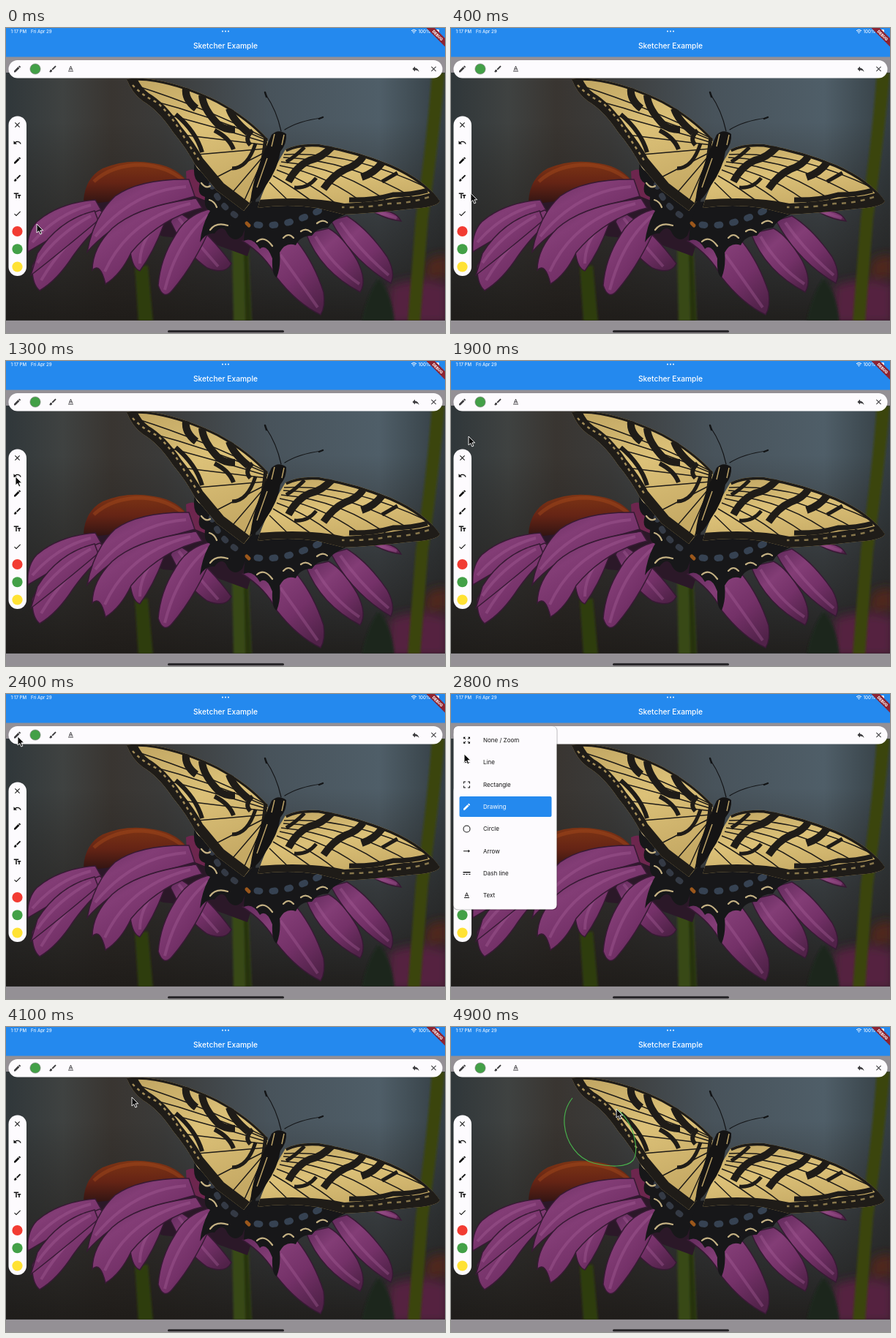
Write an HTML page that moves like this. It is 600 by 417 pixels and loops after 5000 ms.

```html
<!DOCTYPE html>
<html lang="en">
<head>
<meta charset="utf-8">
<title>Sketcher Example</title>
<style>
  :root {
    --trail: path("M0 0c-8 10-12 23-11 36 2 25 18 47 40 53 20 5 45 7 54-4 7-10 3-32-4-47-5-10-12-18-19-23");
  }
  html, body { margin: 0; width: 100%; height: 100%; overflow: hidden; background: #949095; }
  svg { display: block; position: absolute; left: 0; top: 0; }
  text { font-family: Inter, Roboto, sans-serif; }
  #menu { transform-box: fill-box; animation: menu 5s -1ms infinite; }
  #trail { d: var(--trail); stroke-dasharray: 100 300; animation: draw 5s -1ms infinite; }
  #hand { position: absolute; left: 0; top: 0; width: 0; height: 0; animation: tour 5s -1ms infinite; }
  #arrow {
    overflow: visible; offset-path: var(--trail); offset-rotate: 0deg; offset-anchor: 0 0;
    animation: follow 5s -1ms infinite;
  }
  /* Each leg advances once per 100 ms. */
  @keyframes tour {
    0% { transform: translate(42px, 268px); animation-timing-function: steps(4); }
    8% { transform: translate(27px, 226px); animation-timing-function: steps(4); }
    16% { transform: translate(10px, 190px); animation-timing-function: steps(5); }
    26% { transform: translate(13px, 158px); animation-timing-function: steps(6); }
    38% { transform: translate(24px, 103px); animation-timing-function: steps(3); }
    44%, 50% { transform: translate(16px, 58px); animation-timing-function: steps(3); }
    56% { transform: translate(18px, 82px); animation-timing-function: steps(4); }
    64% { transform: translate(40px, 152px); animation-timing-function: steps(4); }
    72%, 74% { transform: translate(273px, 148px); animation-timing-function: steps(4); }
    82% { transform: translate(172px, 96px); animation-timing-function: steps(1); }
    84%, 100% { transform: translate(166px, 97px); }
  }
  @keyframes follow {
    0%, 84% { offset-distance: 0%; animation-timing-function: steps(7); }
    98%, 100% { offset-distance: 100%; }
  }
  @keyframes draw {
    0%, 84% { stroke-dashoffset: 100.2; animation-timing-function: steps(7); }
    98%, 100% { stroke-dashoffset: 0; }
  }
  @keyframes menu {
    0%, 50% { opacity: 0; clip-path: inset(0 0 85% 0); animation-timing-function: steps(3); }
    56%, 74% { opacity: 1; clip-path: inset(0 0 0 0); animation-timing-function: steps(2); }
    78%, 100% { opacity: 0; clip-path: inset(0 0 0 0); }
  }
</style>
</head>
<body>
<svg width="600" height="417" viewBox="0 0 600 417">
  <defs>
    <linearGradient id="air">
      <stop offset="0" stop-color="#30373a"/><stop offset=".13" stop-color="#3f4241"/>
      <stop offset=".24" stop-color="#393531"/><stop offset=".36" stop-color="#3b3b3a"/>
      <stop offset=".6" stop-color="#48535b"/><stop offset=".85" stop-color="#4f5e68"/>
      <stop offset="1" stop-color="#343e43"/>
    </linearGradient>
    <linearGradient id="dusk" x2="0" y2="1">
      <stop offset=".2" stop-color="#211d19" stop-opacity="0"/>
      <stop offset=".6" stop-color="#24211f" stop-opacity=".6"/>
      <stop offset="1" stop-color="#1d1a17" stop-opacity=".92"/>
    </linearGradient>
    <linearGradient id="petal" x2=".8" y2="1">
      <stop offset="0" stop-color="#60295a"/><stop offset=".35" stop-color="#833d76"/>
      <stop offset=".65" stop-color="#743168"/><stop offset="1" stop-color="#512249"/>
    </linearGradient>
    <linearGradient id="cone" x2="0" y2="1">
      <stop offset="0" stop-color="#7d3414"/><stop offset=".45" stop-color="#652415"/>
      <stop offset="1" stop-color="#241012"/>
    </linearGradient>
    <linearGradient id="gold" x2=".4" y2="1">
      <stop offset="0" stop-color="#bfa461"/><stop offset=".5" stop-color="#dcc178"/>
      <stop offset="1" stop-color="#c5a964"/>
    </linearGradient>
    <filter id="soft" x="-30%" y="-30%" width="160%" height="160%"><feGaussianBlur stdDeviation="7"/></filter>
    <filter id="edge" x="-20%" y="-10%" width="140%" height="120%"><feGaussianBlur stdDeviation="1.5"/></filter>
    <filter id="lens" x="-5%" y="-5%" width="110%" height="110%"><feGaussianBlur stdDeviation=".7"/></filter>
    <clipPath id="photo"><path d="M0 61h600v338.7H0z"/></clipPath>
    <path id="wingL" d="M165 70Q182 67 205 71Q245 78 290 100Q332 123 358 152Q356 190 340 232L325 250L288 222L258 186Q247 165 228 142Q208 112 187 100Q172 89 165 70z"/>
    <path id="wingR" d="M382 166Q400 157 428 159Q480 168 526 187Q574 208 593 237Q588 245 555 247Q505 253 462 255L425 246Q385 240 344 246Q352 215 382 166z"/>
    <clipPath id="inL"><use href="#wingL"/></clipPath>
    <clipPath id="inR"><use href="#wingR"/></clipPath>
  </defs>

  <rect width="600" height="417" fill="#949095"/>
  <g clip-path="url(#photo)">
    <path d="M0 61h600v339H0z" fill="url(#air)"/>
    <path d="M0 61h600v339H0z" fill="url(#dusk)"/>
    <g filter="url(#soft)">
      <path d="M524 352Q560 338 605 350V405H520z" fill="#54233f"/>
      <path d="M575 318Q590 308 605 312V342H570z" fill="#50251e"/>
    </g>
    <g filter="url(#edge)">
      <path d="M582 61H600Q592 150 577 260L566 402H549L560 260Q576 150 582 61z" fill="#3a450f"/>
      <path d="M486 402Q494 362 509 343Q527 360 531 402z" fill="#1b281d"/>
      <path d="M176 325h18l7 77h-20z" fill="#2f3c10"/>
      <path d="M309 292h22l5 110h-25z" fill="#384a15"/>
      <path d="M325 300h5l5 102h-8z" fill="#253311"/>
    </g>
    <g filter="url(#lens)">
      <path d="M106 236Q108 205 132 192Q165 178 202 185Q235 190 250 213L236 230L130 247z" fill="url(#cone)"/>
      <path d="M120 210Q145 187 185 187Q220 189 242 208" fill="none" stroke="#a5491b" stroke-width="5" stroke-opacity=".45"/>
      <path d="M246 196Q261 187 272 210L280 243L248 233z" fill="#6d264e"/>
      <path d="M118 240L246 225L345 265L330 312L270 290L215 285L150 262z" fill="#2b1828"/>
      <g id="petals" fill="url(#petal)" stroke="#371a34" stroke-width="1.5"></g>
    </g>

    <g id="hind" fill="#171719">
      <path d="M258 183Q254 207 265 212Q260 228 272 231Q270 247 279 250Q268 268 265 293Q274 279 285 281Q296 266 303 282Q312 295 323 284Q329 268 341 238L347 190z"/>
      <path d="M338 238Q326 263 325 291Q337 285 347 302Q356 294 364 315Q363 338 370 341Q376 326 374 307Q382 292 396 297Q402 284 418 284Q425 273 440 273Q445 263 464 255L420 231z"/>
    </g>
    <g fill="none" stroke-linecap="round">
      <path d="M281 214Q291 243 318 259" stroke="#343a45" stroke-width="8" stroke-dasharray="3 14"/>
      <path d="M343 269Q382 274 433 247" stroke="#364252" stroke-width="9" stroke-dasharray="4 17"/>
      <path d="M260 187q4 9 11 8M267 212q6 8 12 4M278 235q7 2 10 10M279 276q8-11 24-6M343 292q10-9 21 6M379 287q7-8 14 0M403 278q7-5 14 1M425 267q8-6 14-1" stroke="#c4b183" stroke-width="2.2"/>
      <path d="M329 267l3 3" stroke="#9b571b" stroke-width="5"/>
    </g>

    <g filter="url(#lens)">
      <use href="#wingL" fill="url(#gold)"/>
      <g clip-path="url(#inL)" fill="none" stroke="#1f1c18">
        <path d="M165 70Q172 89 187 100Q208 112 228 142Q247 165 258 186L288 222L325 250" stroke-width="27"/>
        <path d="M165 70Q182 67 205 71Q245 78 290 100Q332 123 358 152" stroke-width="6"/>
        <path d="M358 152Q270 108 178 79M358 154Q280 120 195 98M357 157Q292 137 212 116M356 160L232 145M355 165L250 174M354 170L276 210M352 175L305 230M350 182L322 244" stroke-width="1.5"/>
        <path d="M246 82Q244 98 260 110M268 92Q269 110 290 132Q298 139 313 139M305 110Q310 126 331 143" stroke-width="10"/>
        <path d="M232 118Q260 142 268 170M285 140Q305 150 311 166M337 140Q325 151 334 160" stroke-width="6"/>
        <path d="M341 158Q330 192 309 192M355 150Q350 200 332 249" stroke-width="5"/>
        <path d="M173 78Q187 93 207 102Q230 124 245 152L264 181" stroke="#a48d58" stroke-width="2.5" stroke-dasharray="4 5"/>
      </g>

      <use href="#wingR" fill="url(#gold)"/>
      <g clip-path="url(#inR)" fill="none" stroke="#1f1c18">
        <path d="M382 166Q400 157 428 159Q480 168 526 187Q574 208 593 237" stroke-width="7"/>
        <path d="M596 236Q570 246 545 246Q505 253 462 255Q415 244 344 250" stroke-width="30"/>
        <path d="M380 173Q470 168 575 218M379 177Q470 180 558 233M376 183Q460 190 528 242M374 188Q440 200 497 246M370 194Q420 212 460 248M365 202Q400 222 427 244M360 211L394 244" stroke-width="1.5"/>
        <path d="M446 162Q431 178 415 181Q397 189 386 210M488 176Q480 188 464 193Q447 201 434 220M514 184Q504 198 486 204" stroke-width="10"/>
        <path d="M408 163Q395 176 383 183M424 205Q412 220 394 218M535 198L514 210" stroke-width="5"/>
        <path d="M576 222Q555 228 529 228Q501 236 469 235" stroke-width="7"/>
        <path d="M578 231Q551 240 524 240Q495 246 459 245" stroke="#88774c" stroke-width="2.5" stroke-dasharray="6 7"/>
      </g>
    </g>

    <path d="M363 146Q372 137 383 145Q384 158 375 169Q372 192 355 216Q342 239 334 237Q336 215 347 184Q354 165 363 146z" fill="#151414"/>
    <path d="M367 145l-4 17M380 146l-3 14M357 178L343 218" stroke="#b9a066" stroke-width="1.5" fill="none"/>
    <g fill="none" stroke="#131416" stroke-linecap="round" stroke-width="1.2">
      <path d="M376 141Q370 113 355 91M381 139Q400 127 431 123"/>
      <path d="M356 94l-2-6M428 124l5-2" stroke-width="2.4"/>
    </g>
  </g>

  <path id="trail" transform="translate(166 97)" pathLength="100" fill="none" stroke="#48b04c" stroke-width="1.2"/>

  <rect width="600" height="39.5" fill="#2489ee"/>
  <g fill="#fff">
    <text x="300" y="28.2" font-size="10.25" font-weight="500" text-anchor="middle">Sketcher Example</text>
    <g font-size="6.1" font-weight="500" fill="#e9f4ff">
      <text x="6.5" y="6.5">1:17 PM</text>
      <text x="34" y="6.5">Fri Apr 29</text>
      <text x="563.5" y="6.5">100%</text>
    </g>
    <circle cx="296" cy="4.5" r="1"/><circle cx="300" cy="4.5" r="1"/><circle cx="304" cy="4.5" r="1"/>
    <path d="M554 3.7q3.500-3 7 0M555.3 5.2q2.200-1.800 4.400 0" fill="none" stroke="#fff"/>
    <circle cx="557.5" cy="6.6" r=".8"/>
    <rect x="582" y="2" width="10" height="5" rx="1.4"/>
  </g>
  <path d="M574.5 0h11.500l14 14v11.500z" fill="#8d2432"/>
  <text transform="translate(590 10) rotate(45)" y="2" font-size="5.2" font-weight="800" fill="#fff" text-anchor="middle">DEBUG</text>
  <rect x="221" y="413.2" width="159" height="3" rx="1.5" fill="#242326"/>

  <g fill="#fdfbfe">
    <rect x="3.5" y="44" width="593" height="24.5" rx="12.2"/>
    <rect x="3.5" y="120.5" width="24.5" height="218.5" rx="12.2"/>
  </g>
  <g id="tools"></g>
  <g id="menu">
    <rect x="3" y="44" width="142.5" height="251.5" rx="6" fill="#000" opacity=".25"/>
    <rect x="3.5" y="44" width="141" height="250.5" rx="6" fill="#fdfbfe"/>
    <rect x="11.5" y="140" width="126" height="28" rx="2" fill="#2489ee"/>
  </g>
</svg>
<div id="hand">
  <svg id="arrow" width="10" height="15">
    <path d="M0 0V12l2.800-2.500 2 4.500 2.100-.9-2-4.300h3.800z" fill="#0b0b0b" stroke="#fff" stroke-width=".9"/>
  </svg>
</div>
<script>
  const icons = {
    pen: "M3 17.25V21h3.75L17.81 9.94l-3.75-3.75L3 17.25zM20.71 7.04a1 1 0 0 0 0-1.41l-2.34-2.34a1 1 0 0 0-1.41 0l-1.83 1.83 3.75 3.75z",
    brush: "M7 14c-1.66 0-3 1.34-3 3 0 1.31-1.16 2-2 2 .92 1.22 2.49 2 4 2 2.21 0 4-1.79 4-4 0-1.66-1.34-3-3-3zM20.71 4.63l-1.34-1.34a1 1 0 0 0-1.41 0L9 12.25 11.75 15l8.96-8.96a1 1 0 0 0 0-1.41z",
    undo: "M12.5 8c-2.65 0-5.05.99-6.9 2.6L2 7v9h9l-3.62-3.62c1.39-1.16 3.16-1.88 5.12-1.88 3.54 0 6.55 2.31 7.6 5.5l2.37-.78C21.08 11.03 17.15 8 12.5 8z",
    reply: "M10 9V5l-7 7 7 7v-4.1c5 0 8.5 1.6 11 5.1-1-5-4-10-11-11z",
    size: "M2.5 4v3h5v12h3V7h5V4zM21.5 9h-9v3h3v7h3v-7h3z",
    check: "M9 16.17 4.83 12l-1.42 1.41L9 19 21 7l-1.41-1.41z",
    close: "M19 6.41 17.59 5 12 10.59 6.41 5 5 6.41 10.59 12 5 17.59 6.41 19 12 13.41 17.59 19 19 17.59 13.41 12z",
    type: "M5 17v2h14v-2zM9.5 12.8h5l.9 2.2h2.1L12.75 4h-1.5L6.5 15h2.1zM12 5.98 13.87 11h-3.74z",
    zoom: "M15 3l2.3 2.3-2.89 2.87 1.42 1.42L18.7 6.7 21 9V3zM3 9l2.3-2.3 2.87 2.89 1.42-1.42L6.7 5.3 9 3H3zM9 21l-2.3-2.3 2.89-2.87-1.42-1.42L5.3 17.3 3 15v6zM21 15l-2.3 2.3-2.87-2.89-1.42 1.42 2.89 2.87L15 21h6z",
    line: "M4 11h16v2H4z",
    frame: "M3 3h6v2H5v4H3zM15 3h6v6h-2V5h-4zM3 15h2v4h4v2H3zM19 15h2v6h-6v-2h4z",
    ring: "M12 2a10 10 0 0 0 0 20a10 10 0 0 0 0-20zM12 4a8 8 0 0 1 0 16a8 8 0 0 1 0-16z",
    arrow: "M3 11h13V8l5 4-5 4v-3H3z",
    dash: "M2 8h20v3H2zM2 14h5v2H2zM9.5 14h5v2h-5zM17 14h5v2h-5z"
  };
  const icon = (name, x, y, fill = "#111") =>
    `<path transform="translate(${x - 6} ${y - 6}) scale(.5)" fill="${fill}" fill-rule="evenodd" d="${icons[name]}"/>`;
  const dot = (x, y, fill, ring = "none") =>
    `<circle cx="${x}" cy="${y}" r="7.1" fill="${fill}" stroke="${ring}" stroke-width=".6"/>`;
  const add = (id, html) => document.getElementById(id).insertAdjacentHTML("beforeend", html);

  const green = "#43a047", grey = "#3c3b3e";
  add("tools",
    icon("pen", 15.5, 56, grey) + dot(40, 56, green, "#777") + icon("brush", 64, 56, grey) +
    icon("type", 88.5, 56, grey) + icon("reply", 560, 56, grey) + icon("close", 584.5, 56, grey) +
    ["close", "undo", "pen", "brush", "size", "check"].map((n, i) => icon(n, 15.5, 132.5 + i * 24.25)).join("") +
    ["#f23b32", green, "#ffe234"].map((c, i) => dot(15.5, 278 + i * 24.25, c)).join(""));

  const rows = [["zoom", "None / Zoom"], ["line", "Line"], ["frame", "Rectangle"], ["pen", "Drawing"],
    ["ring", "Circle"], ["arrow", "Arrow"], ["dash", "Dash line"], ["type", "Text"]];
  add("menu", rows.map(([name, label], i) => {
    const y = 63.3 + i * 30.3, fill = i === 3 ? "#fff" : "#151515";
    return icon(name, 21.5, y, fill) + `<text x="44" y="${y + 2.8}" font-size="8" fill="${fill}">${label}</text>`;
  }).join(""));

  // Petal outlines, back to front, each with its highlight.
  const petals = [
    ["M500 250Q532 247 540 264Q520 262 500 250z", "M505 251L534 260"],
    ["M232 250Q270 270 308 322Q300 338 275 328Q245 308 225 265z", "M236 260Q262 295 290 326"],
    ["M122 235Q72 239 42 265Q28 280 30 306Q70 282 130 249z", "M116 242Q70 254 36 293"],
    ["M128 249Q60 275 36 325Q35 350 46 359Q70 345 92 311Q118 275 143 259z", "M124 263Q80 291 48 345"],
    ["M121 250Q72 262 43 308L34 338Q75 306 126 263z", "M116 257Q70 282 43 321"],
    ["M203 262Q171 284 170 306Q173 329 183 332Q202 306 216 268z", "M202 273Q183 295 183 322"],
    ["M250 207Q182 206 149 230Q120 257 111 306Q139 274 190 249L258 230z", "M246 217Q174 222 122 285"],
    ["M260 233Q180 243 145 274Q118 301 118 331Q129 320 136 350Q157 337 171 307Q210 260 268 246z", "M252 240Q168 261 135 333"],
    ["M282 247Q248 253 231 284Q211 315 208 352Q215 373 227 359Q258 323 283 265z", "M276 256Q234 291 217 358"],
    ["M323 291Q355 311 370 341Q398 377 430 392Q437 381 434 361Q421 321 398 292L344 281z", "M375 310Q398 342 426 382"],
    ["M410 281Q430 333 484 361Q494 346 480 318Q461 285 441 274z", "M423 285Q446 325 483 350"],
    ["M444 263Q473 318 526 349Q533 335 521 313Q495 275 466 257z", "M457 266Q484 305 523 338"]
  ];
  add("petals", petals.map(([shape, shine]) =>
    `<path d="${shape}"/><path d="${shine}" fill="none" stroke="#a8629b" stroke-width="4" stroke-opacity=".35"/>`).join(""));
</script>
</body>
</html>
```
